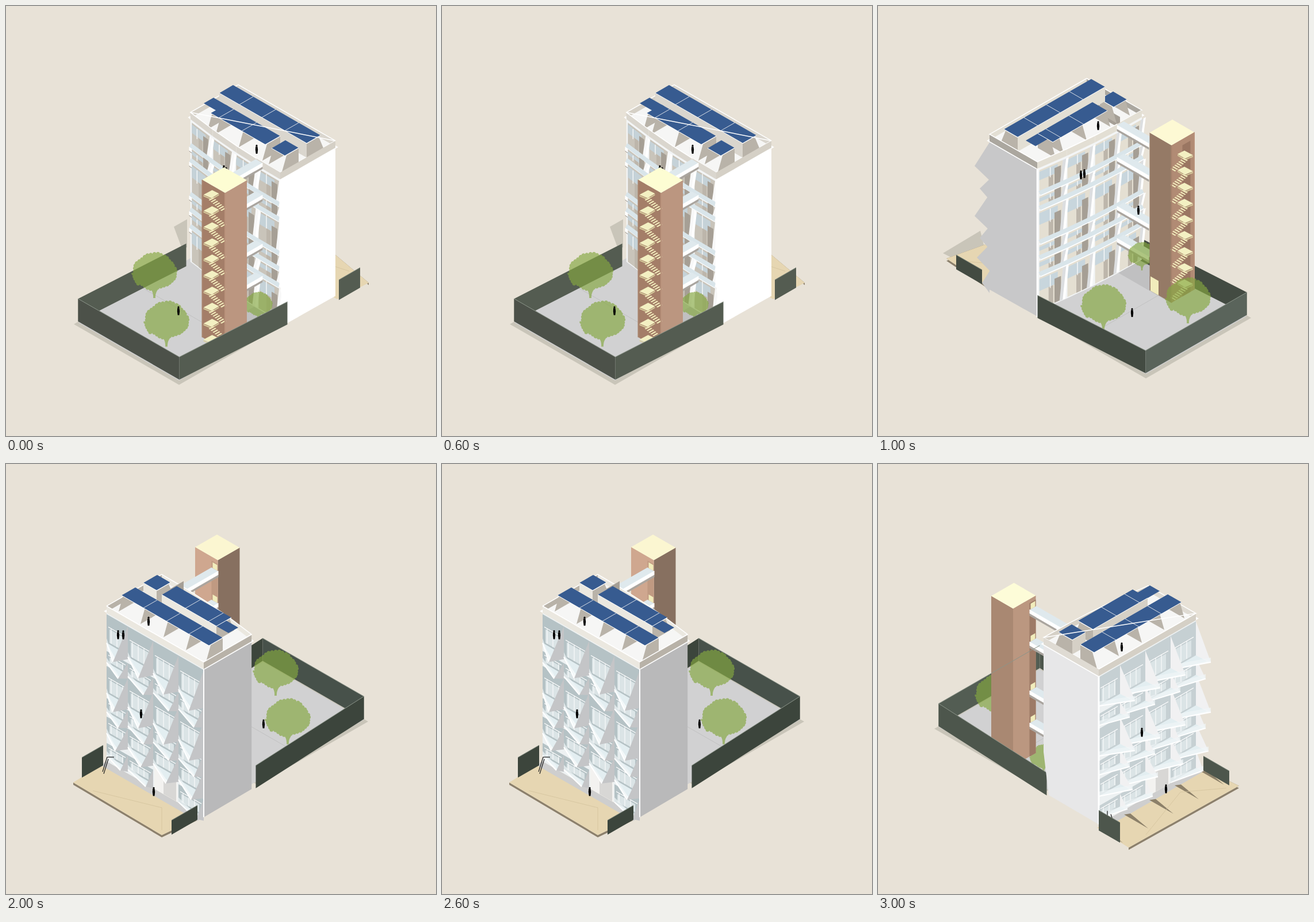
An HTML page that plays this animation: 748 px wide and 748 px high, repeating every 4 s.

```html
<!DOCTYPE html>
<html lang="en">
<head>
<meta charset="utf-8">
<title>Apartment block, four views</title>
<style>
  html, body { margin: 0; width: 100%; height: 100%; overflow: hidden; background: #e8e2d7; }
  svg { display: block; width: 100%; height: 100%; }
  .view { visibility: hidden; animation: turn 4s step-end infinite; animation-delay: calc((var(--i) - 4) * 1s); }
  @keyframes turn { 0% { visibility: visible; } 25%, 100% { visibility: hidden; } }
</style>
</head>
<body>
<svg viewBox="0 0 748 748"></svg>
<script>
// One model, seen from four corners: u runs along the street, v from street to yard, h is up.
// Paired colours are for faces that look left and right on screen.
const TILT = 0.575;
const VIEWS = [
  { x: 547, y: 225, su: [-1, -1], sv: [-1, 1], rear: true, end: '#fff',
    tower: ['#a47e68', '#bb9680'], wall: ['#4c5149', '#545c51'], roof: ['#dad6ce', '#d5d0c6'],
    top: '#fdfdd3', infill: '#c9c4ba', glass: '#c5d2d8', fin: '#f8f8f8' },
  { x: 371, y: 127, su: [-1, 1], sv: [1, 1], rear: true, end: '#c8c8c9',
    tower: ['#957a66', '#b18b74'], wall: ['#434b42', '#5a645b'], roof: ['#aba79f', '#e3dfd4'],
    top: '#fdf9d4', infill: '#e4dfd2', glass: '#c8d6dd', fin: '#dcdee0' },
  { x: 201, y: 228.6, su: [1, 1], sv: [1, -1], rear: false, end: '#b9b9ba',
    tower: ['#cfa78f', '#877060'], wall: ['#47514a', '#3c453c'], roof: ['#ebe8e0', '#b8b2a8'],
    top: '#fbf6d1', glass: '#b5c2c5', fin: '#c4c5c7', slot: '#c09a82' },
  { x: 376, y: 328, su: [1, -1], sv: [-1, -1], rear: false, end: '#e7e7e8',
    tower: ['#a98872', '#bb9780'], wall: ['#4d564c', '#535d53'], roof: ['#dfdbd3', '#d5d0c6'],
    top: '#fdfcd8', glass: '#c6d0d3', fin: '#f1f1f2', slot: '#9d7a66' }
];

const BAY = 44, FRONT = -17, END_A = -9, END_B = 160, STREET = -284, YARD = -271;
const rearEdge = u => 79 - u * u * 5e-4;
const bays = [0, 1, 2, 3].map(i => 28 + BAY * i);
const balconies = [[-28, -84, 26], [-92, -118, 17], [-118, -171, 26], [-174, -204, 17], [-206, -241, 22], [-252, -280, 13]];
const levels = [-26, -72, -98, -157, -184, -213, -272];
const decks = [-16, -72, -157, -213];

const times = (n, fn) => Array.from({ length: n }, (_, i) => fn(i)).join('');
const shape = (fill, pts) => `<path d="M${pts.join(' ')}Z" fill="${fill}"/>`;
const stroke = (color, width, pts) => `<path d="M${pts.join(' ')}" fill="none" stroke="${color}" stroke-width="${width}"/>`;
const at = ([x, y], body, sx = 1, sy = sx) => `<g transform="translate(${x} ${y}) scale(${sx} ${sy})">${body}</g>`;

function seeded(seed) {
  return () => (seed = (seed * 16807) % 2147483647) / 2147483647;
}

function makeTree() {
  const rnd = seeded(23), n = 38;
  const rim = times(n + 1, i => {
    const a = i % n / n * Math.PI * 2 - Math.PI, low = Math.sin(a) > 0;
    const r = 0.93 + 0.1 * rnd();
    const x = 39 * r * Math.cos(a), y = -44 + (low ? 29 : 34) * r * Math.sin(a);
    return (i ? 'A3.5 3.5 0 0 1 ' : 'M') + x.toFixed(1) + ' ' + y.toFixed(1);
  });
  return `<path d="${rim}ZM-2 0Q-1 -9 -7 -17H8Q1 -9 2 0Z" fill="#85a740" fill-opacity=".66"/>`;
}
const treeShape = makeTree();
const personShape = '<circle cy="-14" r="1.6"/><path d="M-1.8 -12.5H1.5L2.2 -7 1.4 0H-1.3L-2.2 -7Z"/>';
const flight = shape('#d9cf9f', ['2 0 16 6 29 -2 29 0 16 8 2 2']) + shape('#f3f0c2', ['2 -1 17 -9 29 -3 16 5']) +
  stroke('#8d6b57', 1, ['14 8 37 26']) + times(7, i => at([11 + 3.4 * i, 8 + 3 * i], shape('#f3edbd', ['0 0 8 -4.5 10 -3.2 2 1.3'])));

function scene(view) {
  const { x, y, su, sv, rear, end, tower, wall, roof, top, infill, glass, fin, slot } = view;
  const isA = view === VIEWS[0], isC = view === VIEWS[2], isD = view === VIEWS[3];
  const p = ([u, v, h]) => [+(x + su[0] * u + su[1] * v).toFixed(1), +(y + (sv[0] * u + sv[1] * v) * TILT - h).toFixed(1)];
  const poly = (fill, ...pts) => shape(fill, pts.map(p));
  const line = (color, width, ...pts) => stroke(color, width, pts.map(p));
  const flat = (fill, u0, u1, v0, v1, h) => poly(fill, [u0, v0, h], [u1, v0, h], [u1, v1, h], [u0, v1, h]);
  const faceU = (fill, u, v0, v1, h0, h1) => poly(fill, [u, v0, h0], [u, v1, h0], [u, v1, h1], [u, v0, h1]);
  const faceV = (fill, v, u0, u1, h0, h1) => poly(fill, [u0, v, h0], [u1, v, h0], [u1, v, h1], [u0, v, h1]);
  const faces = (nu, nv) => sv[0] * nu + sv[1] * nv > 0;
  const tone = (pair, nu, nv) => pair[su[0] * nu + su[1] * nv < 0 ? 0 : 1];
  const nearU = (a, b) => sv[0] > 0 ? b : a;
  const nearV = (a, b) => sv[1] > 0 ? b : a;
  const place = (u, v, h, body, s) => at(p([u, v, h]), body, s);
  const tree = (u, v, s) => place(u, v, YARD, treeShape, s);
  const person = (u, v, h) => place(u, v, h, personShape);

  // Upright band along a line of points; keeps either the near or the far sides.
  function ring(pts, pair, near, hi, lo) {
    return pts.slice(1).map((b, i) => {
      const a = pts[i], nu = b[1] - a[1], nv = a[0] - b[0];
      if (faces(nu, nv) !== near) return '';
      const color = near ? tone(pair, nu, nv) : tone(pair, -nu, -nv);
      return poly(color, [...a, hi(a)], [...b, hi(b)], [...b, lo(b)], [...a, lo(a)]);
    }).join('');
  }

  const plot = [[163.5, 70], [163.5, 258], [-12.5, 258], [-12.5, 70]];
  const wallTop = ([, v]) => -242 + (v - 70) * 0.064;
  const yardWall = near => ring(plot, wall, near, wallTop, q => wallTop(q) - 39.5) +
    (near ? line('#8b9489', 1, ...plot.filter((_, i) => i > 0 && i < 3 || (i ? faces(-1, 0) : faces(1, 0))).map(q => [...q, wallTop(q)])) : '');
  const yard = () => flat('#c9c5b9', -16, 167, 70, 262, -274) + flat('#d1d1d2', -12, 163, 55, 258, YARD) +
    (rear ? flat('#c0c0c1', -12, 34, 76, 172, YARD) : '') +
    line('#bdbdbd', 0.8, [163, 150, YARD], [34, 150, YARD]) + yardWall(false);

  const terrace = () => {
    const a = [-12, -72, -291], b = [161, -91, -272], c = [161, FRONT, -279], d = [-12, FRONT, -288];
    const drop = q => [q[0], q[1], q[2] - 4];
    return poly('#8c806c', drop(a), a, b, c, drop(c), drop(b)) + poly('#e6d6b2', a, b, c, d) +
      (rear ? '' : flat('#cecece', -9, 160, -28, FRONT, STREET)) +
      (isD ? [-16, ...bays].map(u => poly('#8c8069', [u, -24, STREET], [u + 7, -28, STREET], [u, -66, STREET])).join('') : '') +
      line('#d3c39e', 0.8, [20, -70, -288], [110, -40, -283], [150, -80, -276]);
  };
  const streetWall = near => [[-12, -1], [161, 1]].filter(([, n]) => near === (!rear && faces(n, 0)))
    .map(([u, n]) => faceU(tone(wall, faces(n, 0) ? n : -n, 0), u, -57 - (n > 0 ? 17 : 0), -20 - (n > 0 ? 9 : 0), -256, n > 0 ? -281 : -291) +
      line('#7c867b', 1, [u, -57 - (n > 0 ? 17 : 0), -256], [u, -20 - (n > 0 ? 9 : 0), -256])).join('');

  const stairTower = () => {
    const u0 = -6.5, u1 = 33, v0 = 134.5, v1 = 172.5, u = nearU(u0, u1), v = nearV(v0, v1), h = 3;
    const nu = sv[0], nv = sv[1];
    const inside = rear
      ? (isA ? faceU(tower[1], 33, v1, v1, h, YARD) : faceV('#9a7662', v1, 0, 14, -8, YARD)) +
        times(isA ? 10 : 9, i => at(p([isA ? u1 : u0, v1, (isA ? -24 : -38) - 28 * i]), flight, isA ? 1 : -1, 1)) +
        line('#b8917a', 2, [u0, v1, h], [u0, v1, YARD]) + line('#a8836d', 2, [u1, v1, h], [u1, v1, YARD]) +
        (isA ? '' : faceU('#f1ecbb', u1, 136, 150, -246, YARD))
      : faceV(slot, v0, 22, u1, -4, YARD) + decks.map(d => faceV('#f1ecbb', v0, 24, 32, d + 10, d)).join('');
    return faceU(tone(tower, nu, 0), u, v0, v1, h, YARD) + faceV(tone(tower, 0, nv), v, u0, u1, h, YARD) +
      inside + flat(top, u0, u1, v0, v1, h);
  };

  const bridges = () => [...decks].reverse().map(h =>
    faceU('#aaa59f', nearU(22, 34), rearEdge(28), 134.5, h - 6, h - 10) + flat('#dfe9ed', 22, 34, rearEdge(28), 134.5, h) +
    faceU('#fff', nearU(22, 34), rearEdge(28), 134.5, h + 1, h - 6)).join('');

  const onRear = (fill, u0, u1, h0, h1, lean = 0) => poly(fill,
    [u0, rearEdge(u0), h0], [u1, rearEdge(u1), h0], [u1 + lean, rearEdge(u1), h1], [u0 + lean, rearEdge(u0), h1]);
  const rearBay = (u, hi, lo) => {
    const mid = hi + (lo - hi) * 0.42, w = BAY - 8;
    return onRear(infill, u, u + w, hi, lo) + onRear(glass, u + 8, u + w, hi - 3, mid) +
      onRear('#a69f95', u + 3, u + 13, mid + 10, lo) + onRear('#bdb6ab', u + 15, u + 22, mid, lo) +
      line('#fff', 1.2, [u + 22, rearEdge(u), hi], [u + 22, rearEdge(u), mid]) +
      onRear(fin, u - 7, u, hi, lo, 6) + onRear('#fff', u - 9, u - 5, hi, lo, 6);
  };
  const slab = h => {
    const us = [END_B - 2, 115, 75, 35, END_A];
    const edge = (d, lift) => us.map(u => [u, rearEdge(u) + d, h + lift]);
    return poly('#d9e5ea', ...edge(0, 6), ...edge(4, 1).reverse()) + poly('#fff', ...edge(4, 2), ...edge(4, -5).reverse()) +
      line('#938e87', 1, ...edge(4, -5.5));
  };
  const rearFacade = () => {
    const us = [END_B, 115, 75, 35, END_A];
    return poly('#f3f5f6', ...us.map(u => [u, rearEdge(u), -22]), ...us.reverse().map(u => [u, rearEdge(u), -274])) +
      levels.slice(1).map((lo, i) => [-7, 34, 78, 121].map(u => rearBay(u, levels[i] - 4, lo)).join('') +
        (lo > -272 ? slab(lo) : '')).join('');
  };

  const finPlate = (fill, u, [hi, tip, d]) => poly(fill, [u, FRONT, hi], [u, FRONT - d, tip], [u, FRONT, tip - 10]);
  function balcony(i, row) {
    const u = bays[i], u0 = Math.max(u - BAY, END_A), [hi, low, d] = row, tip = low + 3 * (3 - i);
    const plate = finPlate(fin, u, [hi, tip, d]);
    const rim = [[u0, FRONT, tip - 3], [u, FRONT - d, tip]];
    const rail = rim.map(([a, b, c]) => [a, b, c + 8]);
    const tray = poly('#f8fbfb', ...rim, [u, FRONT, tip - 4]) +
      poly('#e3eef1', [u0, FRONT, tip - 3], [u, FRONT, tip - 3], [u, FRONT - d * 0.75, tip - 2]) +
      poly('#f1f7f8b0', ...rim, ...rail.reverse()) + line('#fff', 2, ...rim);
    return faceV(glass, FRONT, u0, u, hi, tip - 4) + faceV('#dbe4e6', FRONT, u0 + 5, u - 8, (hi + tip) / 2, tip) +
      line('#fff', 1.2, [u0 + 3, FRONT, (hi + tip) / 2 + 3], [u - 4, FRONT, (hi + tip) / 2 + 3]) +
      times(3, k => line('#fff', 1, [u0 + 8 + 10 * k, FRONT, (hi + tip) / 2 + 3], [u0 + 8 + 10 * k, FRONT, tip])) +
      (isC ? tray + plate : plate + tray);
  }
  const frontFacade = () => {
    const order = isC ? [0, 1, 2, 3] : [3, 2, 1, 0];
    return faceV('#edf1f2', FRONT, END_A, END_B, -24, STREET) + order.map(i =>
      (i === 2 ? faceV('#f3f2f0', FRONT, 74, 114, -244, STREET) + faceV('#d8d7d5', FRONT, 90, 112, -250, STREET) : '') +
      [...balconies].reverse().filter((_, k) => k || i !== 2).map(row => balcony(i, row)).join('')).join('') +
      line('#222', 1.3, [-1, -32, -289], [-1, -24, -268], [5, -18, -268]) + line('#222', 1.3, [3, -34, -289], [3, -26, -268]);
  };

  const endFace = () => {
    const u = nearU(END_A, END_B), back = rearEdge(u);
    return (rear && !isA ? balconies.map(row => finPlate(end, u, row)).join('') : '') +
      poly(end, [u, FRONT, -24], [u, back, -24], [u, back, -213], [u, back - (isA || isD ? 9 : 0), -283], [u, FRONT, STREET]) +
      line('#fff', isC ? 2 : 3, [u, nearV(FRONT, back), -24], [u, nearV(FRONT, back), isA ? -213 : STREET]);
  };

  // Panels, partitions and closed walls of one roof block.
  function roofBlock({ u0, u1, v0, v1, seams, closed, extra }) {
    const gap = seams.map(s => line('#d9dee5', 1, [s, v0, 0], [s, v1, 0])).join('');
    const open = closed === v1 ? v0 : v1, out = Math.sign(open - closed);
    const back = faceV(faces(0, -out) ? tone(roof, 0, -out) : '#f0eeea', closed, u0, u1, 0, -25);
    const ribs = [u0, ...seams, u1].map(s => poly('#b9b3a9', [s, closed, -1], [s, open - out * 3, -1], [s, open + out * 5, -25], [s, closed, -25])).join('');
    const panel = flat('#375b90', u0, u1, v0, v1, 0) + (extra ? flat('#375b90', u1 - 5, u1 + 21, v0, v0 + 17, 0) : '');
    const n = [nearU(u0, u1), nearV(v0, v1)];
    return (faces(0, out) ? back + ribs : ribs + back) + panel + gap +
      line('#fff', 1, [u0, n[1], 0], [u1, n[1], 0]) + line('#fff', 1, [n[0], v0, 0], [n[0], v1, 0]);
  }
  const blocks = [
    { u0: 0, u1: 152, v0: 0, v1: 24, seams: [38, 78, 117], closed: 24 },
    { u0: 34, u1: 129, v0: 36, v1: 62, seams: [75, 115], closed: 36, extra: true },
    { u0: 0, u1: 23, v0: 38, v1: 62, seams: [], closed: 38 }
  ];
  const depth = b => sv[0] * nearU(b.u0, b.u1) + sv[1] * nearV(b.v0, b.v1);
  const roofTop = () => {
    const rim = [[END_A, FRONT], [END_B, FRONT], ...[END_B, 115, 70, 33, END_A].map(u => [u, rearEdge(u)]), [END_A, FRONT]];
    const outline = rim.map(q => [...q, -14]);
    return poly('#fff', ...rim.map(([u, v]) => [u * 1.04 - 3, v * 1.03 - 1, -24])) + poly('#f6f6f5', ...rim.map(q => [...q, -24])) +
      ring(rim, roof, false, () => -14, () => -24) + line('#fff', 1.5, ...outline) +
      (faces(1, 0) ? faceU('#a59f96', 29, 38, 79, -4, -24) : '') +
      blocks.sort((a, b) => depth(a) - depth(b)).map(roofBlock).join('') +
      (rear ? person(49.5, 61.5, -25) : person(47.5, -0.5, -25)) +
      ring(rim, roof, true, () => -14, () => -26) +
      line('#fff', 1.5, ...outline.filter(([u, v]) => u === nearU(END_A, END_B) || (rear ? v > 0 : v < 0)).slice(0, rear ? 5 : 3));
  };

  const building = () => (rear ? rearFacade() : frontFacade()) + endFace() + roofTop();
  const trees = () => tree(134, 155, 1) + tree(50, 218, 1) + person(88, 159, -272);
  const streetSide = () => terrace() + streetWall(false);

  if (rear) {
    const shade = isA ? ['292 384 315 371 315 420 305 419'] : ['113 430 178 391 190 440 140 444'];
    return shape('#c9c5b9', shade) + streetSide() + yard() + building() +
      person(88, 76, -78) + person(93, 75, -78) + bridges() + person(25, 107, -160) +
      tree(10, 98, 0.62) + stairTower() + trees() + yardWall(true);
  }
  const behind = isC ? stairTower() + bridges() + trees() : trees() + tree(10, 98, 0.62) + stairTower() + bridges();
  return yard() + behind + yardWall(true) + streetSide() + building() + streetWall(true) +
    person(58.5, -24.5, -166) + person(90.5, -34.5, -277) + (isC ? person(11, FRONT, -60) + person(20, FRONT, -55) : '');
}

document.querySelector('svg').innerHTML =
  VIEWS.map((view, i) => `<g class="view" style="--i:${i}">${scene(view)}</g>`).join('');
</script>
</body>
</html>
```
